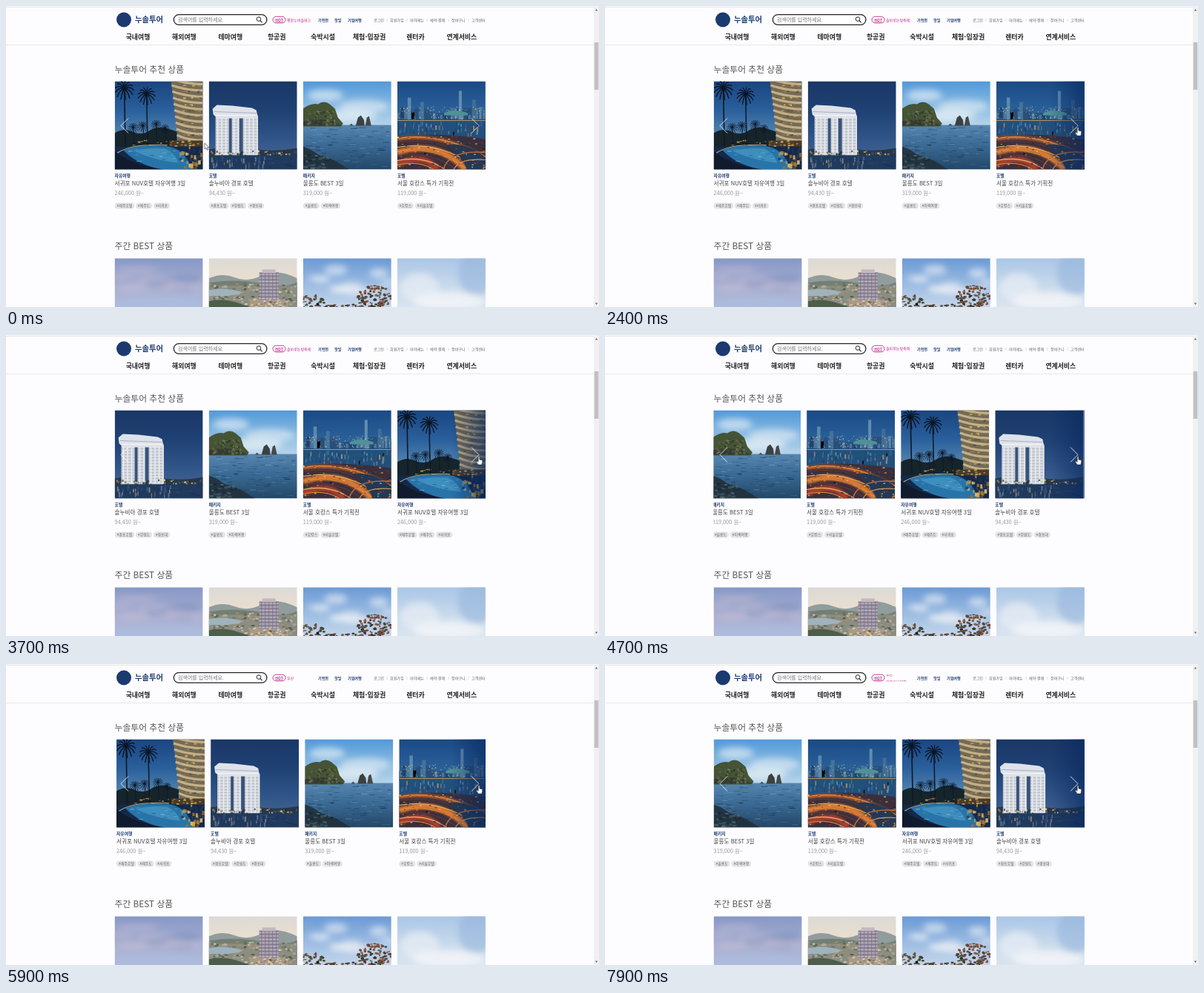
These frames come from a looping animation (800x406 px, 8000 ms). An HTML page:

```html
<!DOCTYPE html>
<html lang="ko">
<head>
<meta charset="utf-8">
<title>여행 상품</title>
<style>
html, body { margin: 0; width: 100%; height: 100%; overflow: hidden; background: #fdfcfe; }
#stage { display: block; width: 800px; height: 406px; font-family: "Noto Sans CJK KR", "Noto Sans CJK", "Noto Sans", sans-serif; }
</style>
</head>
<body>
<svg id="stage" viewBox="0 0 800 406"></svg>
<script>
const stage = document.getElementById('stage');
const NAVY = '#1c3a70', PINK = '#c02a8c';

// --- markup helpers ---
const rect = (x, y, w, h, fill, more = '') => `<rect x="${x}" y="${y}" width="${w}" height="${h}" fill="${fill}" ${more}/>`;
const path = (d, fill, more = '') => `<path d="${d}" fill="${fill}" ${more}/>`;
const line = (d, color, width = 1, more = '') => path(d, 'none', `stroke="${color}" stroke-width="${width}" ${more}`);
const oval = (x, y, rx, ry, fill, more = '') => `<ellipse cx="${x}" cy="${y}" rx="${rx}" ry="${ry}" fill="${fill}" ${more}/>`;
const text = (x, y, size, str, fill, more = '') => `<text x="${x}" y="${y}" font-size="${size}" fill="${fill}" ${more}>${str}</text>`;
const bold = 'font-weight="700"', middle = 'text-anchor="middle"', soft = 'filter="url(#soft)"';
const repeat = (n, fn) => Array.from({ length: n }, (_, i) => fn(i)).join('');
const gradient = (id, ...colors) => `<linearGradient id="${id}" x2="0" y2="1">${
  colors.map((c, i) => `<stop offset="${i / (colors.length - 1)}" stop-color="${c}"/>`).join('')}</linearGradient>`;

let seed = 7;
const rnd = (a, b) => {
  seed = (seed * 16807) % 2147483647;
  return +(a + (b - a) * seed / 2147483647).toFixed(1);
};
const pick = list => list[Math.floor(rnd(0, list.length - .01))];
const specks = (n, x0, x1, y0, y1, w, h, colors) =>
  repeat(n, () => rect(rnd(x0, x1), rnd(y0, y1), rnd(w / 2, w), rnd(h / 2, h), pick(colors), `opacity="${rnd(.4, 1)}"`));
const leaves = (n, x, y, rx, ry, colors) => repeat(n, () => {
  const a = rnd(0, 6.28), r = Math.sqrt(rnd(0, 1));
  return oval((x + Math.cos(a) * r * rx).toFixed(1), (y + Math.sin(a) * r * ry).toFixed(1), rnd(1, 2.6), rnd(.8, 1.8), pick(colors));
});

// --- pictures, each 119 x 119 ---
function palm(x, y, r, base) {
  const fronds = repeat(13, i => {
    const a = i / 13 * Math.PI * 2, dx = Math.cos(a) * r, dy = Math.sin(a) * r;
    return line(`M${x} ${y}Q${x + dx * .6} ${y + dy * .6 - r * .3} ${x + dx} ${y + dy + r * .2}`, '#0b1525', r / 9);
  });
  return line(`M${x} ${y}L${x + 1.5} ${base}`, '#101824', r / 8) + fronds;
}

const pool = () => rect(0, 0, 119, 119, 'url(#dusk)')
  + path('M0 70Q12 62 24 68T48 66T84 68V92H0Z', '#16242b')
  + path('M76 0H119V88H86Q82 40 76 0Z', '#756a53')
  + repeat(10, k => {
    const x = 76 + k * .9, y = k * 8.4 - 3;
    return line(`M${x} ${y}Q98 ${y + 7} 119 ${y + 7}`, '#c3b089', 3.2)
      + specks(6, x + 3, 116, y + 7, y + 9, 4, 2.5, ['#e0b45c', '#45464a', '#94835c']);
  })
  + rect(74, 80, 45, 9, '#4a3c28') + specks(30, 24, 117, 79, 87, 4, 2, ['#f3c65c', '#d98a2b', '#ffe6a0'])
  + rect(0, 88, 119, 31, '#14294a')
  + path('M12 93Q34 85 66 87Q95 89 104 119H62Q28 111 12 93Z', '#2874a9')
  + path('M26 94Q44 89 68 91Q82 97 86 110Q50 106 26 94Z', '#4b9fca', 'opacity=".65"')
  + line('M3 97Q22 84 68 86', '#b7aa84', 1.2)
  + path('M0 94Q20 112 66 119H0Z', '#101b2e')
  + specks(40, 86, 116, 88, 116, 4, 6, ['#e5a93b', '#f7d278', '#a86f26', '#2a3850'])
  + specks(24, 18, 80, 90, 108, 7, 1, ['#85c6dc', '#194f8c', '#377eb5'])
  + palm(38, 60, 7, 84) + palm(56, 58, 7, 83) + palm(25, 62, 7, 86) + palm(68, 63, 6, 83)
  + palm(13, 10, 13, 88) + palm(43, 18, 12, 86);

const towers = () => rect(0, 0, 119, 119, 'url(#night)')
  + path('M0 92Q30 86 60 91T119 90V102H0Z', '#26394c')
  + rect(26, 47, 22, 48, '#39547c')
  + [[9, 18], [31, 10], [46, 20]].map(([x, w]) => rect(x, 46, w, 54, '#d3d7df')
    + repeat(13, i => line(`M${x} ${48 + i * 4}h${w}`, '#a8b4c9', .8))
    + repeat(Math.floor(w / 5), i => line(`M${x + 3 + i * 5.5} 47v52`, '#f0eee8', 1.4))).join('')
  + path('M5 37L11 32L32 33L58 36L64 39L66 48L58 50H12L6 45Z', '#dfe2e9')
  + line('M7 41L64 43', '#a3b1c8', 1.2) + line('M9 46H63', '#f8f7f3', 1.2)
  + specks(50, 0, 117, 93, 99, 3, 3, ['#d6a75b', '#f7e3a8', '#465563', '#1e303f'])
  + rect(0, 100, 119, 19, '#203a5d')
  + specks(35, 2, 76, 100, 114, 2, 7, ['#8d8a80', '#627ba0', '#3f5d87'])
  + specks(25, 50, 112, 102, 117, 9, 1, ['#2c4c76', '#182f50']);

const sea = () => rect(0, 0, 119, 119, 'url(#day)')
  + `<g ${soft}>${oval(30, 19, 24, 8, '#f0f5f8', 'opacity=".6"')}${oval(82, 34, 34, 9, '#e8f1f6', 'opacity=".6"')}${oval(55, 47, 45, 8, '#eaf2f6', 'opacity=".7"')}</g>`
  + rect(0, 59, 119, 60, 'url(#water)')
  + path('M0 37Q11 29 20 31Q28 25 36 31L43 37L47 49L54 57L51 61H0Z', '#465436')
  + path('M0 54Q18 49 35 53L53 60H0Z', '#363c34')
  + specks(75, 1, 42, 38, 58, 4, 3, ['#657342', '#2b3927', '#515d3c', '#77745c'])
  + path('M71 60L74 49L78 46L82 52L83 60Z', '#3b4140') + path('M84 60L86 49L89 47L92 60Z', '#454947')
  + path('M62 60l3-3 3 3Z', '#4a5251')
  + specks(130, 0, 112, 62, 117, 9, 1, ['#6c98bb', '#2b5276', '#42709a', '#20405f'])
  + path('M0 88L10 92L24 101L43 107L62 119H0Z', '#22303b', 'opacity=".9"')
  + specks(36, 0, 38, 98, 117, 6, 3, ['#3b4e58', '#182632', '#4e6369']);

const city = () => rect(0, 0, 119, 119, 'url(#evening)')
  + path('M0 43Q20 36 40 41T78 39T119 42V56H0Z', '#27507a')
  + repeat(25, i => {
    const h = rnd(5, 17);
    return rect(i * 4.8, 51 - h, rnd(3, 5), h, pick(['#284f7a', '#4a769c', '#1f4168', '#5c86a8']));
  })
  + rect(14, 22, 4.5, 30, '#5b89af') + rect(31, 28, 5, 24, '#44739c') + rect(83, 13, 4, 39, '#628db0') + rect(101, 25, 5, 27, '#426d94')
  + specks(80, 0, 117, 34, 51, 1.5, 1.5, ['#f1c36d', '#c8dfeb', '#e6a752'])
  + path('M63 43Q77 36 95 43V46H63Z', '#4e9296')
  + rect(0, 52, 119, 26, '#234f7b') + line('M0 53H119', '#c09a60', .9)
  + specks(60, 0, 115, 54, 70, 2, 7, ['#a98a5b', '#42759e', '#6f97b0', '#1b416b'])
  + path('M0 75Q44 68 119 78V119H0Z', '#3a2f3b')
  + `<g filter="url(#glow)">${line('M0 78Q60 68 119 104', '#c4672f', 4)}${line('M0 96Q54 78 92 119', '#d97a33', 8)}${line('M0 112Q36 96 54 119', '#a8402f', 8)}</g>`
  + repeat(7, i => line(`M0 ${77 + i * 6}Q${58 - i * 3} ${68 + i * 6} ${119 - i * 9} ${102 + i * 5}`, ['#e5883b', '#623639', '#edb968'][i % 3], 1.1))
  + path('M66 86Q94 82 119 103V119H94Q86 98 66 86Z', '#243854')
  + line('M62 119Q70 92 119 96', '#b66b42', 1.6) + line('M76 119Q84 103 119 106', '#d39a5d', 1.2)
  + specks(130, 0, 116, 74, 117, 3, 1.6, ['#ffd179', '#ed7a2c', '#bd3728', '#1e2c40', '#2b3b55']);

const pinkClouds = () => rect(0, 0, 119, 119, 'url(#lilac)')
  + `<g ${soft}>${repeat(12, () => oval(rnd(-5, 120), rnd(8, 44), rnd(14, 30), rnd(2, 5), pick(['#c3bcd6', '#8193be', '#cabfd6', '#9aa6cc']), 'opacity=".6"'))}${oval(60, 60, 60, 6, '#abc0e2', 'opacity=".6"')}</g>`;

const harbor = () => rect(0, 0, 119, 119, 'url(#cream)')
  + path('M0 27Q18 19 35 26T72 23T119 27V70H0Z', '#919c9c') + path('M0 33Q35 27 70 34T119 32V70H0Z', '#737f72')
  + rect(0, 37, 119, 33, '#8a8d80')
  + specks(190, 0, 116, 33, 66, 5, 3, ['#ddd2c0', '#606d62', '#b7aea0', '#4b5a4c', '#a89070'])
  + path('M0 43Q22 38 46 46Q34 52 0 51Z', '#9fb3bd')
  + path('M0 58Q26 52 54 66H0Z', '#4c5d49')
  + rect(68, 19, 26, 51, '#8d8799') + rect(72, 15, 18, 5, '#c3b8bf')
  + repeat(9, i => line(`M68 ${22 + i * 4.6}h26`, '#c9bbc0', 1.3))
  + repeat(5, i => line(`M${71 + i * 5} 20v48`, '#736c88', .7)) + rect(55, 56, 52, 14, '#a79a8b')
  + specks(45, 54, 105, 54, 66, 4, 3, ['#e6c384', '#6d6964', '#d8d0c4']);

const autumn = () => rect(0, 0, 119, 119, 'url(#blue)')
  + `<g ${soft}>${repeat(11, () => oval(rnd(10, 119), rnd(14, 50), rnd(10, 22), rnd(3, 7), '#eef1f6', 'opacity=".6"'))}</g>`
  + leaves(150, 97, 56, 24, 20, ['#6b4538', '#34382b', '#8d563f', '#514a3a'])
  + leaves(90, 11, 65, 22, 16, ['#3f4730', '#6f4a36', '#54503a'])
  + leaves(50, 55, 68, 30, 7, ['#473f33', '#7b604a']);

const haze = () => rect(0, 0, 119, 119, 'url(#pale)')
  + `<g ${soft}>${oval(30, 40, 26, 20, '#e8eef5', 'opacity=".7"')}${oval(106, 20, 24, 30, '#95b5dc', 'opacity=".6"')}${oval(70, 58, 48, 12, '#f3f5f8', 'opacity=".85"')}</g>`;

const frame = (x, y, picture) => `<svg x="${x}" y="${y}" width="119" height="119">${picture()}</svg>`;

// --- travel cards ---
const cards = [
  [pool, '자유여행', '서귀포 NUV호텔 자유여행 3일', '246,000', ['제주호텔', '제주도', '서귀포']],
  [towers, '호텔', '솔누비아 경포 호텔', '94,430', ['경포호텔', '강원도', '경포대']],
  [sea, '패키지', '울릉도 BEST 3일', '319,000', ['울릉도', '이색여행']],
  [city, '호텔', '서울 호캉스 특가 기획전', '119,000', ['호캉스', '서울호텔']]
];

function card([picture, kind, title, price, tags], i) {
  let x = 0;
  const pills = tags.map(tag => {
    const w = tag.length * 4.6 + 8.2;
    const pill = rect(x, 265.5, w, 8, '#e4e3e5', 'rx="4"') + text(x + w / 2, 271.4, 4.9, '#' + tag, '#666', middle);
    x += w + 1.9;
    return pill;
  }).join('');
  return `<g id="card${i}">${frame(0, 101.5, picture)}${text(0, 231, 5.8, kind, NAVY, bold)}${
    text(0, 241.8, 7.6, title, '#444')}${text(0, 254.6, 7.3, price + ' 원~', '#999')}${pills}</g>`;
}

const defs = `<defs>
  <filter id="soft" x="-30%" y="-30%" width="160%" height="160%"><feGaussianBlur stdDeviation="4"/></filter>
  <filter id="glow"><feGaussianBlur stdDeviation="1.5"/></filter>
  <clipPath id="window">${rect(146.5, 100, 500.5, 180, '#000')}</clipPath>
  <clipPath id="ticker">${rect(378, 14, 40, 9.5, '#000')}</clipPath>
  <linearGradient id="shade"><stop stop-color="#08285f" stop-opacity="0"/><stop offset="1" stop-color="#08285f" stop-opacity=".65"/></linearGradient>
  ${gradient('dusk', '#1a4580', '#2a609c', '#5c8cb4', '#345a7c')}
  ${gradient('night', '#1a3766', '#1f4174', '#33568a', '#4d6c94')}
  ${gradient('day', '#5299d8', '#93c0e4', '#d9e8f0', '#d9e8f0')}
  ${gradient('water', '#5787b0', '#386791', '#234766')}
  ${gradient('evening', '#1b4a85', '#2a6099', '#3f7aab', '#2c557f')}
  ${gradient('lilac', '#8798c6', '#a9b0d1', '#b1bfe0', '#b1bfe0')}
  ${gradient('cream', '#dcdad6', '#eee0cc', '#c6c5bd', '#8c918b')}
  ${gradient('blue', '#6c9ad5', '#a0bfe3', '#d8e2ef', '#d8e2ef')}
  ${gradient('pale', '#aac6e6', '#cadbec', '#dfe8f1', '#e7edf3')}
  ${cards.map(card).join('')}
</defs>`;

// --- page ---
const nav = ['국내여행', '해외여행', '테마여행', '항공권', '숙박시설', '체험-입장권', '렌터카', '연계서비스'];
const quick = [[421, '기획전'], [443, '핫딜'], [461, '기업여행']];
const account = [[496, '로그인'], [518, '회원가입'], [545, '마이메뉴'], [572, '예약·결제'], [601, '장바구니'], [628, '고객센터']];
const news = ['평창누비솔파크', '솔마루눈빛축제', '부산', '여름바다여행'];
const LINE = 9.5;

const header = line('M0 1.5H793', '#e4e3e5') + line('M0 52.5H793', '#e8e7ea')
  + `<circle cx="159" cy="18.5" r="10" fill="${NAVY}"/>`
  + text(174, 22.3, 10.3, '누솔투어', NAVY, 'font-weight="900"')
  + rect(226.3, 11.6, 125.6, 13.8, '#fff', 'rx="6.9" stroke="#27272c" stroke-width="1.3"')
  + text(232, 21.1, 7, '검색어를 입력하세요.', '#777')
  + `<circle cx="341" cy="17.6" r="2.8" fill="none" stroke="#222"/>` + line('M343 19.7L345.6 22.3', '#222', 1.1)
  + rect(360, 14.3, 17, 8.6, '#fff', `rx="4.3" stroke="${PINK}" stroke-width=".9"`)
  + text(368.5, 20.6, 5, 'HOT', PINK, `${bold} ${middle} text-decoration="underline"`)
  + `<g clip-path="url(#ticker)"><g id="news">${news.map((s, i) => text(379, 20.7 + i * LINE, 5, s, PINK, 'font-weight="500"')).join('')}</g></g>`
  + quick.map(([x, s]) => text(x, 20.8, 5.1, s, NAVY, bold)).join('')
  + account.map(([x, s], i) => text(x, 20.8, 5.1, s, '#666') + (i ? line(`M${x - 4} 17v4`, '#ccc', .6) : '')).join('')
  + nav.map((s, i) => text(178 + i * 62.4, 44.9, 8.9, s, '#222', `${bold} ${middle}`)).join('');

const scrollbar = rect(793, 0, 7, 406, '#f1f0f2') + rect(793.7, 49, 5.6, 64, '#c1c0c2')
  + path('M794.8 6.5L796.5 4L798.2 6.5Z', '#666') + path('M794.8 400.5L796.5 403L798.2 400.5Z', '#666');

const chevron = d => line(d, '#fff', .9, 'opacity=".9"');

stage.innerHTML = defs + header + scrollbar
  + text(146.6, 89.8, 11.8, '누솔투어 추천 상품', '#555') + text(146.6, 328.3, 11.8, '주간 BEST 상품', '#555')
  + `<g clip-path="url(#window)">${repeat(5, () => '<use class="slot"/>')}</g>`
  + rect(600, 101.5, 47, 119, 'url(#shade)', 'id="hover"')
  + chevron('M165 151.5L155 161.5L165 171.5') + chevron('M628 151.5L638 161.5L628 171.5')
  + [pinkClouds, harbor, autumn, haze].map((p, i) => frame(146.6 + i * 127.1, 340.3, p)).join('')
  + path('M0 0V8.2L2 6.4L3.4 9.4L4.8 8.8L3.4 5.9H6Z', '#fff', 'id="arrow" stroke="#222" stroke-width=".6"')
  + path('M0 0Q1.3-.6 1.4 .7V4L4.6 4.8Q5.6 5.2 5.2 7L4.4 11H-.4L-3 7.2Q-3.3 5.8-1.6 6.3L-.4 7.3V.7Z', '#fff',
    'id="hand" transform="translate(637.5 164)" stroke="#222" stroke-width=".6"');

// --- motion ---
const LOOP = 8000;
const slides = [2900, 3800, 4668, 5442, 6300, 7150], rolls = [1610, 4610, 7610];
const ease = p => {
  p = Math.min(1, Math.max(0, p));
  return p * p * (3 - 2 * p);
};
const steps = (starts, t, length) => starts.reduce((sum, s) => sum + ease((t - s) / length), 0);
const slots = [...stage.querySelectorAll('.slot')];
const [newsList, hover, arrow, hand] = ['news', 'hover', 'arrow', 'hand'].map(id => document.getElementById(id));
const show = (el, on) => el.setAttribute('visibility', on ? 'visible' : 'hidden');

function draw(t) {
  const pos = steps(slides, t, 500), first = Math.floor(pos);
  slots.forEach((slot, k) => {
    slot.setAttribute('href', '#card' + (first + k) % 4);
    slot.setAttribute('x', 146.6 + (first + k - pos) * 127.1);
  });
  newsList.setAttribute('transform', `translate(0 ${-LINE * steps(rolls, t, 600)})`);
  const move = ease((t - 200) / 800), over = t >= 1900;
  arrow.setAttribute('transform', `translate(${268 + 335 * move} ${185 - 8 * move})`);
  show(arrow, t < 1000 || (t > 1600 && !over));
  show(hand, over);
  show(hover, over);
}

const start = performance.now();
function tick() {
  draw((performance.now() - start) % LOOP);
  requestAnimationFrame(tick);
}
tick();
</script>
</body>
</html>
```
